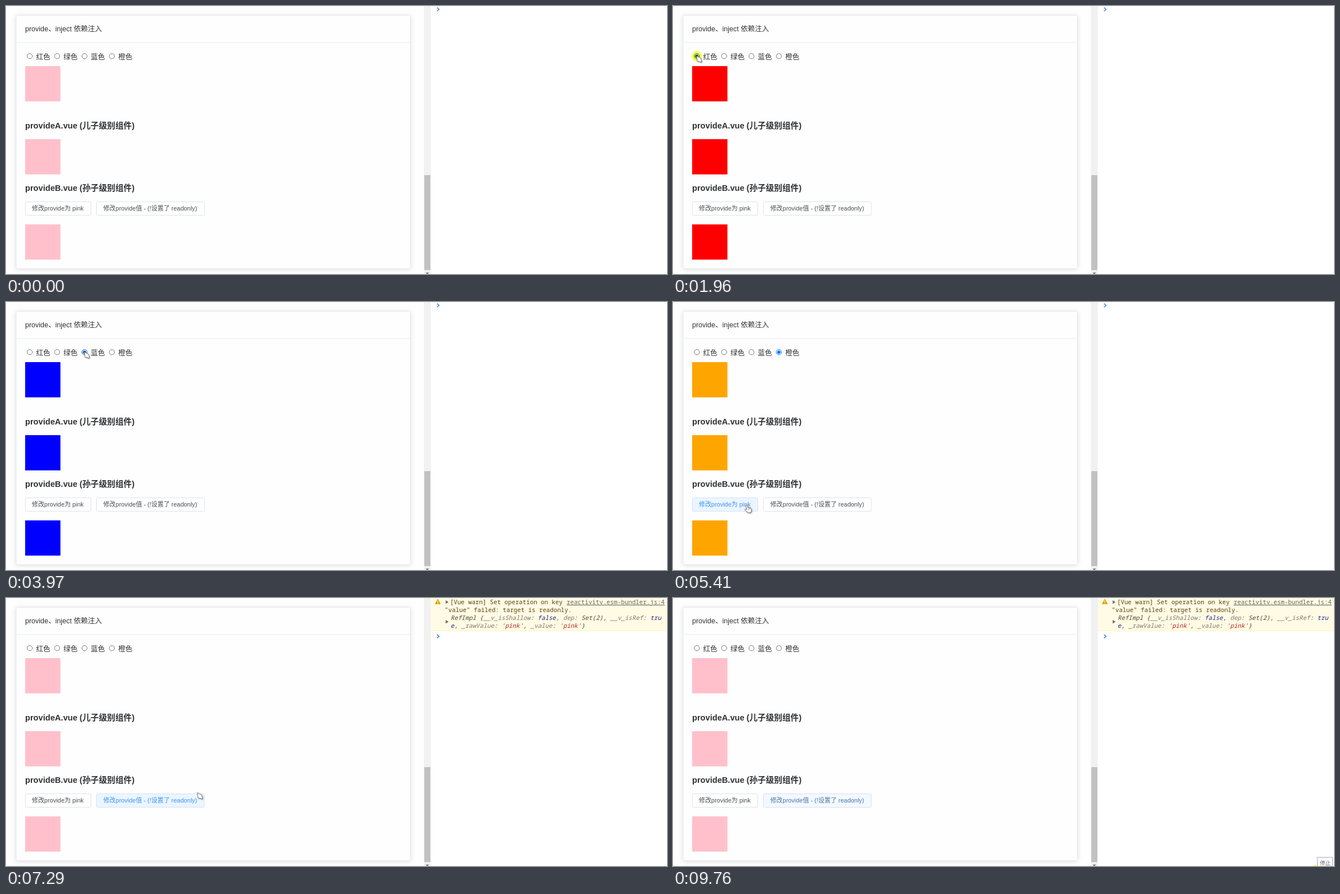
Recreate the animation shown at these times as an HTML page. Size 1173 px wide and 477 px high, loop 9.83 s.

```html
<!DOCTYPE html>
<html lang="zh-CN">
<head>
<meta charset="utf-8">
<title>provide / inject</title>
<style>
html, body { margin: 0; width: 100%; height: 100%; overflow: hidden; background: #fefefe; }
svg { display: block; width: 1173px; height: 477px; }
text { font: 12.5px "Liberation Sans", "Noto Sans CJK SC", "Noto Sans CJK", sans-serif; fill: #303133; white-space: pre; }
.head { font-size: 14.625px; font-weight: 700; }
.btn rect { fill: #fff; stroke: #dfe2e8; }
.btn text { font-size: 10.94px; fill: #4c4e52; }
.hot rect { fill: #ecf5ff; stroke: #cde5ff; }
.hot text { fill: #3a94f5; }
.fade rect { fill: #f4f9ff; stroke: #d0e3f8; }
.fade text { fill: #4676a9; }
#log text { font: 10.74px "Noto Sans Mono", "DejaVu Sans Mono", monospace; fill: #5c4310; }
#log .obj { font-style: italic; fill: #51452f; }
#log .link { fill: #6a655a; text-decoration: underline; }
.key { fill: #82756f; }
.kw { fill: #22228c; }
.str { fill: #b8201a; }
#glow { fill: #ffff5c; mix-blend-mode: multiply; }
#pointer path { fill: #fff; stroke: #666; stroke-width: .9; stroke-linejoin: round; filter: drop-shadow(1.2px 1.8px 1px rgba(0,0,0,.35)); }
</style>
</head>
<body>
<svg viewBox="0 0 1173 477">
  <rect x="18" y="16.5" width="699.5" height="451" rx="3" fill="#fefefe" stroke="#e6e8ee" style="filter:drop-shadow(0 1.5px 4px rgba(0,0,0,.12))"/>
  <path d="M18 65H717.5" stroke="#e8eaf0"/>
  <text x="34" y="45">provide、inject 依赖注入</text>
  <g id="radios"></g>
  <g id="boxes"></g>
  <text class="head" x="34" y="217.5">provideA.vue (儿子级别组件)</text>
  <text class="head" x="34" y="328.5">provideB.vue (孙子级别组件)</text>
  <g class="btn" id="btnA"><rect x="34.5" y="348.5" width="116" height="24" rx="2.5"/><text x="46" y="363.5">修改provide为 pink</text></g>
  <g class="btn" id="btnB"><rect x="160.5" y="348.5" width="191.5" height="24" rx="2.5"/><text x="172.7" y="363.5">修改provide值 - (!设置了 readonly)</text></g>

  <rect x="741.5" width="12.5" height="477" fill="#f1f1f1"/>
  <rect x="742.3" y="301" width="10.7" height="169" fill="#c1c1c1"/>
  <path d="M744.7 474.5h6l-3 3z" fill="#707070"/>
  <rect x="754" width="419" height="477" fill="#fff"/>

  <g id="log">
    <rect x="754" width="419" height="58" fill="#fffbe5"/>
    <path d="M754 58.5H1173" stroke="#fff5c2"/>
    <path d="M766.3 2L770.8 10.5H761.8Z" fill="#e0a100" stroke="#e0a100" stroke-linejoin="round"/>
    <path d="M766.3 4.5v3.2m0 1.1v1.2" stroke="#fff" stroke-width="1.2"/>
    <path d="M780.3 4l5 3.2-5 3.2zM780.3 39l5 3.2-5 3.2z" fill="#6e6e6e"/>
    <text x="788" y="11">[Vue warn] Set operation on key</text>
    <text x="995" y="11" class="link">reactivity.esm-bundler.js:4</text>
    <text x="778.5" y="25">"value" failed: target is readonly.</text>
    <text x="789" y="39" class="obj">RefImpl {<tspan class="key">__v_isShallow</tspan>: <tspan class="kw">false</tspan>, <tspan class="key">dep</tspan>: Set(2), <tspan class="key">__v_isRef</tspan>: <tspan class="kw">tru</tspan></text>
    <text x="789" y="53" class="obj"><tspan class="kw">e</tspan>, <tspan class="key">_rawValue</tspan>: <tspan class="str">'pink'</tspan>, <tspan class="key">_value</tspan>: <tspan class="str">'pink'</tspan>}</text>
  </g>
  <path id="prompt" d="M764.8 2.8l3.7 3.2-3.7 3.2" fill="none" stroke="#367cdb" stroke-width="1.5"/>

  <circle id="glow" r="9.5"/>
  <g id="tip">
    <rect x="1143.5" y="461.5" width="27" height="20" fill="#fff" stroke="#a9a9b5"/>
    <text x="1148" y="475" style="font-size:9.5px;fill:#65657a">停止</text>
  </g>
  <g id="pointer">
    <path id="arrow" d="M-.5-.5L6.5 3.2Q8.8 5.5 8.5 11L5.5 9.8 1 9Z"/>
    <path id="hand" d="M0 1Q1-1 2.5 1L4.2 5Q9 3.8 10.2 8 10.3 12 9 14L4 14Q0 11-1.5 8.3 0 6.8 2 8.3ZM5 8.5v-3M7.3 8.3v-3"/>
  </g>
</svg>
<script>
const $ = id => document.getElementById(id);
const LOOP = 9830, PRESS = 220, REACT = 100;
const PINK = '#ffc0cb';
const options = [['红色', '#f00'], ['绿色', '#008000'], ['蓝色', '#00f'], ['橙色', '#ffa500']];
const radioY = 89.3, radioX = i => 42.2 + i * 48.55;

// The pointer reaches each stop at "at"; a stop with "press" is clicked, then left.
const stop = (at, x, y, press, effect) => ({ at, x, y, press, effect, leave: press ? press + PRESS : at });
const radioStop = (i, at, press) => stop(at, radioX(i) - i / 2, radioY, press, { chosen: i, colour: options[i][1] });
const stops = [
  stop(70, 1096, 474),
  stop(1080, 19, 127),
  radioStop(0, 1700, 1850),
  radioStop(1, 2560, 3010),
  radioStop(2, 3620, 3700),
  radioStop(3, 4510, 4640),
  stop(5390, 129, 361, 5670, { chosen: -1, colour: PINK }),
  stop(6620, 203, 365, 6870, { failed: true }),
  stop(7290, 340, 347),
  stop(8000, 1150, 8),
  stop(8920, 1113, 475),
  stop(9630, 1141, 484.5, 9690)
];
const gone = 8920, shownTip = 9630;
const clicks = stops.filter(s => s.press);
const [pressA, pressB] = clicks.slice(4).map(s => s.press);

$('radios').innerHTML = options.map(([label], i) =>
  `<circle cx="${radioX(i)}" cy="${radioY}" r="4.6" fill="#fff"/><circle cx="${radioX(i)}" cy="${radioY}" r="2.9"/>` +
  `<text x="${radioX(i) + 11.3}" y="94.5">${label}</text>`).join('');
$('boxes').innerHTML = [107, 237, 388.7].map(y => `<rect x="34" y="${y}" width="62.6" height="62.7"/>`).join('');
const radios = [...$('radios').querySelectorAll('circle')];

const within = (t, a, b) => t >= a && t < b;
const show = (el, on) => el.style.display = on ? '' : 'none';
const ease = k => k * k * (3 - 2 * k);

function pointerAt(t) {
  const next = stops.find(s => s.at > t) || stops.at(-1);
  const from = stops[Math.max(0, stops.indexOf(next) - 1)];
  const k = ease(Math.min(1, Math.max(0, (t - from.leave) / (next.at - from.leave))));
  return [from.x + (next.x - from.x) * k, from.y + (next.y - from.y) * k];
}

function draw(t) {
  const [x, y] = pointerAt(t);
  const state = { chosen: -1, colour: PINK, failed: false };
  clicks.filter(s => t >= s.press + REACT).forEach(s => Object.assign(state, s.effect));

  $('boxes').setAttribute('fill', state.colour);
  options.forEach((_, i) => {
    const over = Math.hypot(x - radioX(i), y - radioY) < 6;
    const on = i === state.chosen;
    const tint = on ? (over ? '#005cc8' : '#0075ff') : (over ? '#4f4f4f' : '#767676');
    radios[2 * i].setAttribute('stroke', tint);
    radios[2 * i + 1].setAttribute('fill', on ? tint : 'none');
  });

  // A clicked button keeps its highlight until focus moves on.
  const inRow = within(y, 348, 373);
  const overA = inRow && within(x, 34, 151), overB = inRow && within(x, 160, 352);
  $('btnA').classList.toggle('hot', overA || within(t, pressA, pressB));
  $('btnB').classList.toggle('hot', overB || t >= pressB);
  $('btnB').classList.toggle('fade', t >= shownTip + 50);

  show($('log'), state.failed);
  $('prompt').setAttribute('transform', `translate(0 ${state.failed ? 62.3 : 0})`);
  show($('tip'), t >= shownTip);

  const move = `translate(${x} ${y})`;
  $('glow').setAttribute('transform', move);
  $('pointer').setAttribute('transform', move);
  show($('glow'), clicks.some(s => within(t, s.press, s.press + PRESS)));
  show($('pointer'), within(t, stops[0].at, gone));
  show($('hand'), overA || overB);
  show($('arrow'), !overA && !overB);
}

function frame() {
  draw(performance.now() % LOOP);
  requestAnimationFrame(frame);
}
frame();
</script>
</body>
</html>
```
